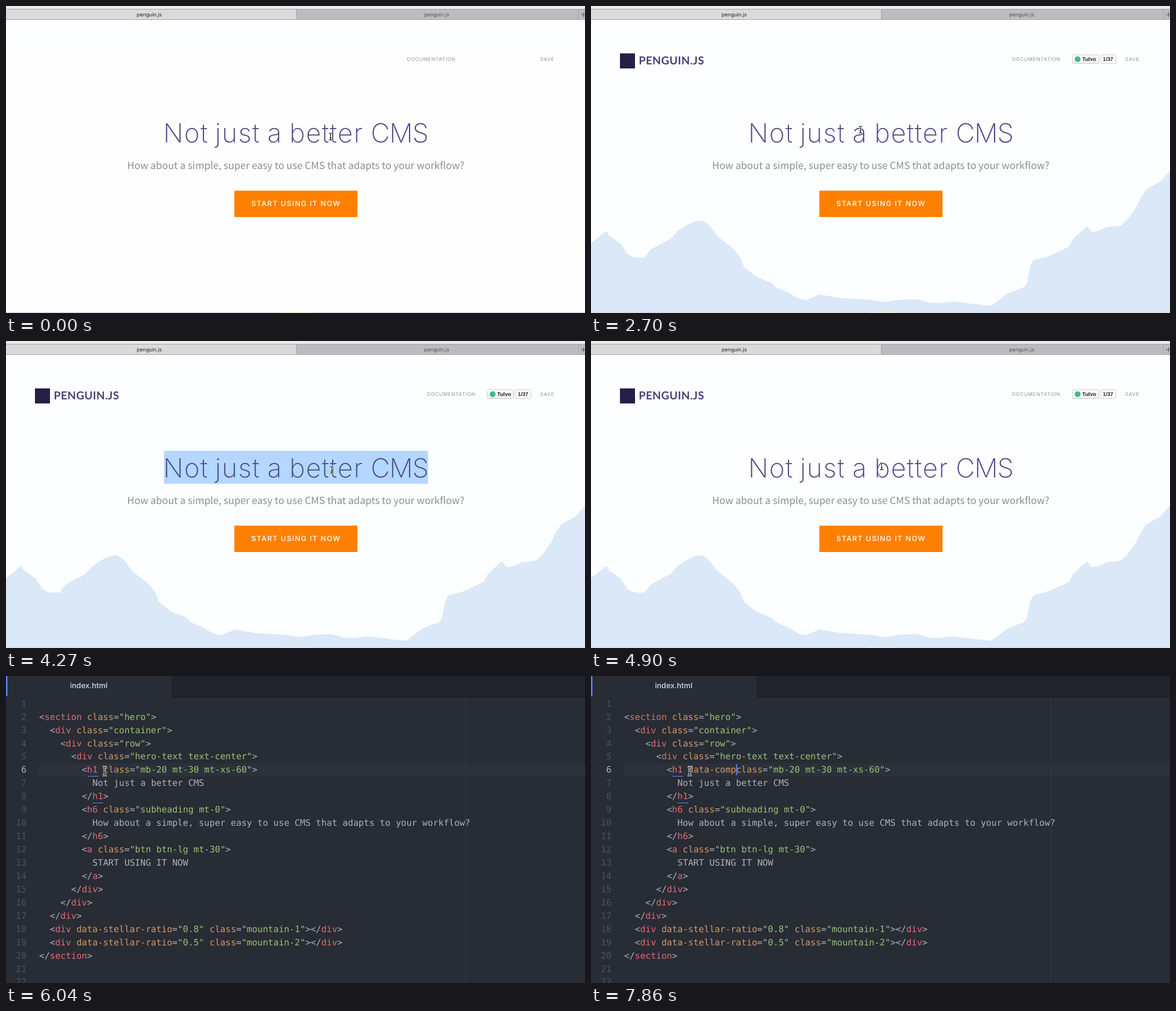
These frames come from a looping animation (1000x531 px, 7.99 s). An HTML page:

```html
<!DOCTYPE html>
<html lang="en">
<head>
<meta charset="utf-8">
<title>penguin.js</title>
<style>
html, body { margin: 0; width: 100%; height: 100%; overflow: hidden; background: #fff; }
svg { display: block; width: 100%; height: 100%; }
text { font-family: Inter, sans-serif; text-rendering: geometricPrecision; white-space: pre; }
.mid { text-anchor: middle; }
.tab { font-size: 8.9px; }
.nav { font-size: 8.6px; letter-spacing: .63px; fill: #969696; }
.brand { font: 700 19px Lato, sans-serif; letter-spacing: .45px; fill: #454278; }
.badge { font: 700 9.2px "Liberation Sans", Arial, sans-serif; fill: #222; }
.title { font-size: 45.5px; font-weight: 150; letter-spacing: 1.5px; fill: #4b4784; }
.title .caps { letter-spacing: -1px; }
.sub { font: 17.06px "Noto Sans CJK JP", "Noto Sans CJK SC", "Noto Sans", sans-serif; fill: #8e8e8e; }
.cta { font-size: 12.3px; font-weight: 500; letter-spacing: 1.33px; fill: #fff; }
.file { font-size: 13px; font-weight: 500; fill: #d7dae0; }
#code text { font: 15.28px "DejaVu Sans Mono", monospace; fill: #abb2bf; }
#code .num { fill: #4b5261; text-anchor: end; }
#code .now { fill: #abb2bf; }
.tag { fill: #e06c75; }
.attr { fill: #d19a66; }
.str { fill: #98c379; }
</style>
</head>
<body>
<svg viewBox="0 0 1000 531" preserveAspectRatio="none">
  <defs>
    <path id="beam" fill="none" d="M-3-6Q0-6 0-4.3V4.3Q0 6-3 6M3-6Q0-6 0-4.3M0 4.3Q0 6 3 6M-1.6 2H1.6"/>
    <linearGradient id="shade" x2="0" y2="1">
      <stop stop-color="#fff"/><stop offset="1" stop-color="#eee"/>
    </linearGradient>
  </defs>

  <g id="page">
    <rect width="1000" height="531" fill="#fcfeff"/>
    <rect id="blank" y="80" width="1000" height="451" fill="#fefefe"/>
    <g id="scenery">
      <path fill="#dae8f7" d="M0 410L19 395 27 389 31 397 40 403 52 412 63 429 72 434 82 435.5 93 435 103 421 120 412 137 403 150 389 165 379 180 372 192 371 202 377 218 397 232 409 246 420 258 435 264 451 285 468 312 479 320 487 340 495 358 506 371 509 395 499 430 505 480 508 508 512 535 508 562 507 583 513 600 514 625 511 650 514 690 518.5 703 510 718 498 735 491 747 487 753 479 758 452 764 440 790 433 805 426 825 417 832 404 845 391 857 381 864 391 875 390 890 383 915 380 925 371 940 351 950 331 958 318 970 311 983 304 990 296 1000 285V531H0Z"/>
      <rect x="50" y="82" width="26" height="26" fill="#262047"/>
      <text class="brand" x="82.5" y="101">PENGUIN.JS</text>
      <g stroke="#ccc">
        <rect x="831.5" y="84.5" width="45" height="15" rx="2" fill="url(#shade)"/>
        <path fill="#fff" d="M882.5 84.5H904.5Q906.5 84.5 906.5 86.5V97.5Q906.5 99.5 904.5 99.5H882.5Q880.5 99.5 880.5 97.5V94L878.5 92 880.5 90V86.5Q880.5 84.5 882.5 84.5Z"/>
      </g>
      <circle cx="840.5" cy="92" r="5" fill="#3eb991"/>
      <text class="badge mid" x="860.5" y="95.3">Tulvo</text>
      <text class="badge mid" x="893" y="95.3">1/37</text>
    </g>
    <rect y="529.5" width="1000" height="1.5" fill="#d3d9e8"/>
    <rect x="477" y="529.5" width="48" height="1.5" fill="#f6ecc9"/>

    <rect width="1000" height="5" fill="#ececec"/>
    <rect y="5" width="501" height="19" fill="#dbdadb"/>
    <rect x="501" y="5" width="499" height="19" fill="#bebbbe"/>
    <path stroke="#a5a3a5" d="M0 5.5H1000M0 23.5H1000M501.5 5V24M988.5 5V24"/>
    <path stroke="#555" d="M993 15H1000M997.5 11V19"/>
    <text class="tab mid" x="247.5" y="18" fill="#222">penguin.js</text>
    <text class="tab mid" x="744" y="18" fill="#555">penguin.js</text>

    <text class="nav" id="docs" y="94.5">DOCUMENTATION</text>
    <text class="nav" x="922.5" y="94.5">SAVE</text>
    <rect id="sel" y="190" height="57" fill="#b3d7ff"/>
    <text class="title" y="236"><tspan x="271.5">Not </tspan><tspan x="361">just </tspan><tspan x="451.5">a </tspan><tspan x="489.5">better </tspan><tspan class="caps" x="630">CMS</tspan></text>
    <text class="sub mid" x="500.5" y="282">How about a simple, super easy to use CMS that adapts to your workflow?</text>
    <rect x="394.4" y="319.4" width="212.6" height="45.6" fill="#ff8000"/>
    <text class="cta mid" x="501" y="346.3">START USING IT NOW</text>
  </g>

  <g id="editor">
    <rect width="1000" height="531" fill="#282c34"/>
    <rect x="287" width="713" height="36" fill="#21252b"/>
    <path stroke="#181a1f" fill="none" d="M287.5 0V36.5H1000"/>
    <rect width="2.5" height="35" fill="#568af2"/>
    <text class="file" x="110.5" y="21">index.html</text>
    <rect x="57" y="151" width="943" height="22.5" fill="#2c313a"/>
    <path stroke="#363b45" d="M794 37V531"/>
    <path stroke="#568af2" d="M140.5 173.5H159M149.5 219.5H168"/>
    <g id="code"></g>
    <rect id="caret" y="152.5" width="2" height="19" fill="#568af2"/>
  </g>

  <g id="mouse">
    <use href="#beam" stroke="#fff" stroke-width="2.8"/>
    <use href="#beam" stroke="#111" stroke-width="1.1"/>
  </g>
</svg>

<script>
const LOOP = 7990, EDITOR = 6040, KEY = 130;
const LEFT = 57.3, CHAR = 9.2, ROW = 22.94;
const $ = id => document.getElementById(id);

// [start, x, y]
const mouse = [
  [0, 560.5, 226], [1400, 472, 195], [2700, 465.5, 214], [4270, 562.5, 223],
  [4400, 559.5, 217], [4900, 502, 217], [5070, 386.5, 217], [5710, 378, 217],
  [EDITOR, 170.5, 164.5]
];
// [start, left, right]
const selection = [
  [0, 0, 0], [3470, 476, 490], [3800, 273, 729], [4570, 0, 0],
  [5070, 456, 560], [5240, 399, 560], [5710, 362, 438]
];
const lines = `
<section class="hero">
  <div class="container">
    <div class="row">
      <div class="hero-text text-center">
        <h1 class="mb-20 mt-30 mt-xs-60">
          Not just a better CMS
        </h1>
        <h6 class="subheading mt-0">
          How about a simple, super easy to use CMS that adapts to your workflow?
        </h6>
        <a class="btn btn-lg mt-30">
          START USING IT NOW
        </a>
      </div>
    </div>
  </div>
  <div data-stellar-ratio="0.8" class="mountain-1"></div>
  <div data-stellar-ratio="0.5" class="mountain-2"></div>
</section>

`.split("\n");

const span = (cls, s) => `<tspan class="${cls}">${s}</tspan>`;
const paint = s => s.replace(/<(\/?)(\w+)|("[^"]*")|([\w-]+)(?==)/g,
  (m, slash, tag, str, attr) =>
    tag ? "&lt;" + slash + span("tag", tag) : str ? span("str", str) : span("attr", attr));

$("code").innerHTML = lines.map((line, i) => {
  const y = 52.7 + i * ROW, body = line.trimStart();
  const x = LEFT + (line.length - body.length) * CHAR;
  return `<text class="num${i === 5 ? " now" : ""}" x="35.5" y="${y}">${i + 1}</text>` +
    `<text id="line${i + 1}" x="${x}" y="${y}">${paint(body)}</text>`;
}).join("");

const at = (list, t) => list.findLast(row => row[0] <= t);
const keys = (t, start, max) => Math.max(0, Math.min(max, Math.floor((t - start) / KEY) + 1));
const show = (id, on) => { $(id).style.display = on ? "" : "none"; };
let shown = 0;

function draw(t) {
  const coding = t >= EDITOR, loaded = t >= 1400;
  show("page", !coding);
  show("editor", coding);
  show("blank", !loaded);
  show("scenery", loaded);
  $("docs").setAttribute("x", loaded ? 727 : 692.5);

  const [, left, right] = at(selection, t);
  $("sel").setAttribute("x", left);
  $("sel").setAttribute("width", right - left);

  const typed = keys(t, 6690, 3) + keys(t, 7210, 6);
  if (typed !== shown) {
    const word = "data-comp".slice(0, typed);
    $("line6").innerHTML = paint(lines[5].trim().replace("class", word + "class"));
    $("caret").setAttribute("x", LEFT + (12 + typed) * CHAR);
    shown = typed;
  }
  show("caret", typed > 0);

  const [, x, y] = at(mouse, t);
  $("mouse").setAttribute("transform", `translate(${x} ${y}) scale(${coding ? 1.2 : 1})`);
}

const begin = performance.now();
function tick() {
  draw((performance.now() - begin) % LOOP);
  requestAnimationFrame(tick);
}
tick();
</script>
</body>
</html>
```
